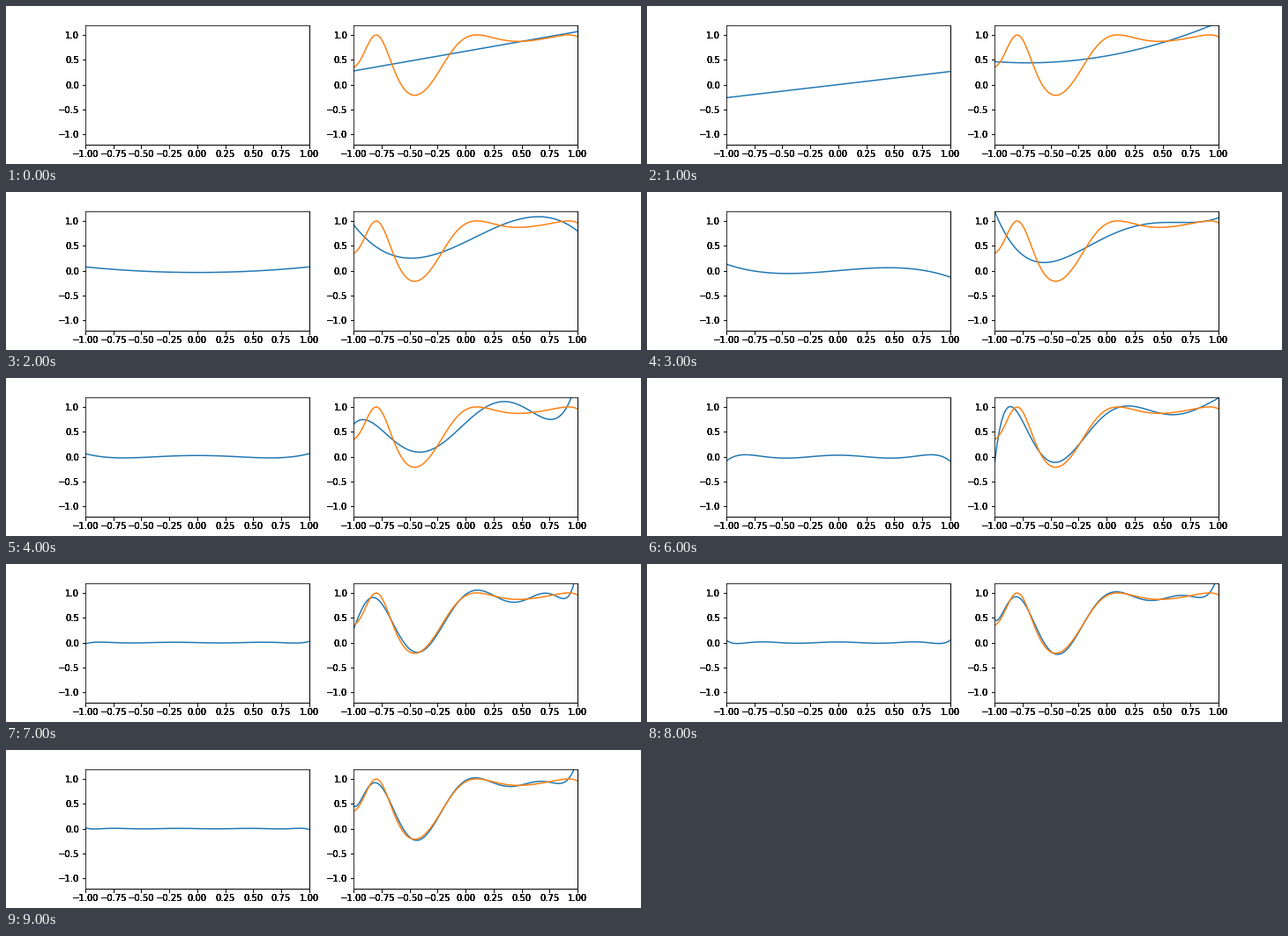
Write a matplotlib script that moves like this. It is 720 px wide and 180 px high and loops after 10 s.

```python
import numpy as np
import matplotlib.pyplot as plt
from matplotlib.animation import FuncAnimation
from numpy.polynomial import Legendre

plt.rcParams["font.family"] = "DejaVu Sans"
plt.rcParams["font.size"] = 10
plt.rcParams["text.kerning_factor"] = 6

DPI = 72
STEPS = 10
LABEL_LAYERS = 5  # overlaid axes give the heavy tick labels

x = np.linspace(-1, 1, 100)
dx = x[1] - x[0]


def wave(x):
    """Smooth curve touching 1 at three peaks, with a deep and a shallow dip."""
    peaks = (x + 0.8) * (x - 0.1) * (x - 0.92)
    sway = np.cos(2 * x + 1.58 - 0.071 * np.exp(-3.25 * x))
    return np.cos(peaks * (4.45 + 2.5 * sway))


# Project the curve on the Legendre polynomials with a plain Riemann sum
basis = [Legendre.basis(n)(x) for n in range(STEPS)]
inner = [np.sum(wave(x) * p) * dx for p in basis]


def component(n):
    return inner[n] * basis[n]


def partial_sum(degree):
    return sum((2 * n + 1) / 2 * component(n) for n in range(degree + 1))


def setup(ax):
    ax.set_xlim(-1, 1)
    ax.set_ylim(-1.2, 1.2)
    ax.set_xticks(np.arange(-1, 1.01, 0.25))
    ax.set_yticks(np.arange(-1, 1.01, 0.5))


fig, (left, right) = plt.subplots(1, 2, figsize=(720 / DPI, 180 / DPI), dpi=DPI)
fig.subplots_adjust(left=0.125, right=0.9, bottom=0.125, top=0.88, wspace=0.2)

for ax in (left, right):
    setup(ax)
    for _ in range(LABEL_LAYERS - 1):
        overlay = fig.add_axes(ax.get_position(), facecolor="none")
        overlay.spines[["left", "top"]].set_visible(False)
        setup(overlay)

term, = left.plot(x, component(0), color="C0", lw=1.5)
total, = right.plot(x, partial_sum(1), color="C0", lw=1.5)
right.plot(x, wave(x), color="C1", lw=1.5)


def update(i):
    term.set_ydata(component(i))
    total.set_ydata(partial_sum(min(i + 1, STEPS - 1)))
    return term, total


anim = FuncAnimation(fig, update, frames=STEPS, interval=1000,
                     repeat=True, repeat_delay=0)
plt.show()
```
